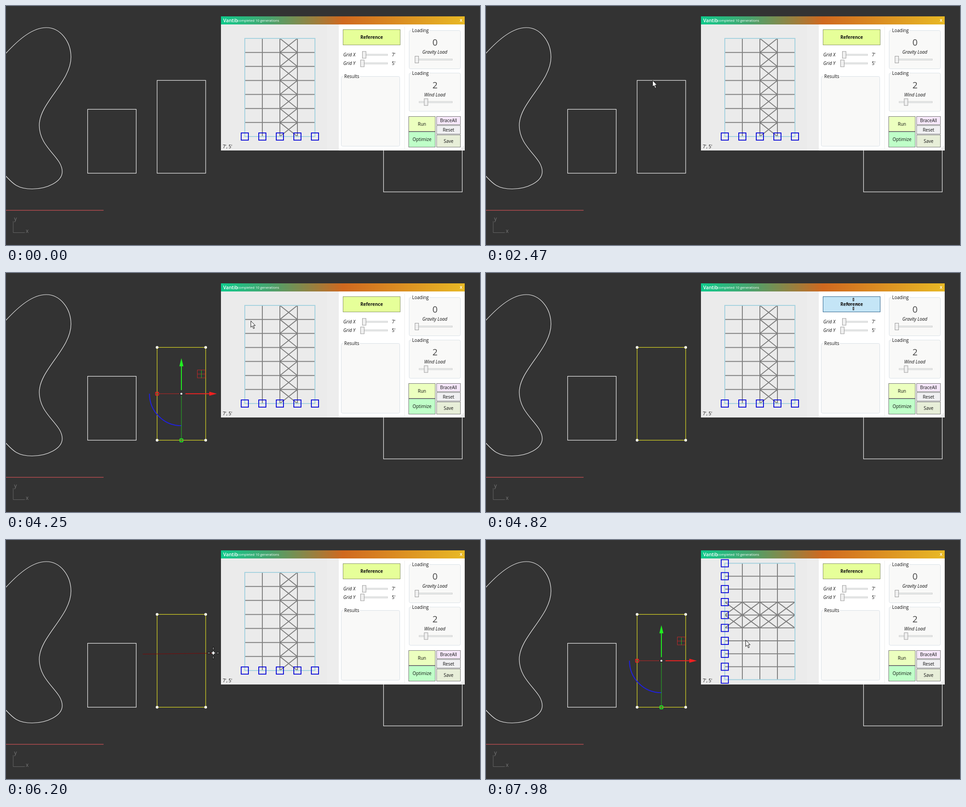
These frames come from a looping animation (1054 by 531 pixels, 8000 ms). An HTML page:

```html
<!DOCTYPE html>
<html lang="en">
<head>
<meta charset="utf-8">
<title>Bracing tool</title>
<style>
  html, body { margin: 0; width: 100%; height: 100%; overflow: hidden; background: #333; }
  svg { display: block; width: 1054px; height: 531px; }
  text { font: 10px "Open Sans", "Noto Sans", sans-serif; fill: #111; }
  .mid { text-anchor: middle; }
  .it { font-style: italic; }
  .bold { font-weight: 700; }
  .big { font-size: 20px; fill: #444; }
  .axis { font-size: 12px; fill: #777; }
  .title { font-size: 10.5px; font-weight: 600; fill: #fff; }
  .status { font-size: 7.6px; fill: #fff; }
  .wire { fill: none; stroke: #f0f0f0; stroke-width: 1.2; }
  .beam { fill: none; stroke: #808080; stroke-width: 2; }
  .edge { fill: none; stroke: #a6d2df; stroke-width: 2; }
  .pin { fill: none; stroke: #0000d8; stroke-width: 1.8; }
</style>
</head>
<body>
<svg viewBox="0 0 1054 531">
  <defs>
    <linearGradient id="bar">
      <stop offset="0" stop-color="#0fca8c"/>
      <stop offset=".2" stop-color="#48a36e"/>
      <stop offset=".5" stop-color="#d0681f"/>
      <stop offset="1" stop-color="#e8b925"/>
    </linearGradient>
  </defs>
  <rect width="1054" height="531" fill="#333"/>
  <path d="M0 453.9H217" stroke="#a0474b" stroke-width="1.6"/>
  <path d="M16 478V503.5H42" fill="none" stroke="#666"/>
  <text class="axis" x="18" y="477">y</text>
  <text class="axis" x="44" y="504">x</text>

  <path class="wire" d="M-2 107C30 72 60 48 90 48S144 78 144.5 113C145 168 74 215 74 265S125 335 125 368C125 390 92 406.5 58 406.5S14 393-2 376"/>
  <rect class="wire" x="181.5" y="229.5" width="108" height="142"/>
  <rect class="wire" x="839.5" y="300" width="175" height="113"/>
  <rect id="shape" class="wire" x="336" y="165.3" width="108" height="206.2"/>
  <g id="dots" fill="#fffff0"></g>

  <g id="gumball" fill="none" transform="translate(390 268.3)">
    <path d="M-71 0A71 71 0 0 0 0 71" stroke="#2020e0" stroke-width="2"/>
    <path d="M-49 0H-4" stroke="#f02020" stroke-width="1.4" stroke-dasharray="1.5"/>
    <path d="M0 5V100" stroke="#20e020" stroke-width="1.6" stroke-dasharray="1.5"/>
    <path d="M0-8V-62" stroke="#20f020" stroke-width="2"/>
    <path d="M0-79l4.5 18h-9z" fill="#20f020"/>
    <path d="M9 0H63" stroke="#f02020" stroke-width="2"/>
    <path d="M79 0l-17-4.5v9z" fill="#f02020"/>
    <rect x="-57.3" y="-3.3" width="6.6" height="6.6" rx="1" stroke="#f02020" stroke-width="1.8"/>
    <rect x="-3.3" y="100.1" width="6.6" height="6.6" rx="1" stroke="#20f020" stroke-width="1.8"/>
    <path d="M35.5-52.8h17.5v17.5h-17.5zm0 9h17.5" stroke="#c02828"/>
    <path d="M44.5-52v17" stroke="#20c020"/>
    <circle r="2.8" fill="#fff" stroke="#111"/>
  </g>

  <g id="window">
    <rect x="478" y="23" width="542" height="298" fill="#fff"/>
    <rect x="478" y="41" width="262" height="280" fill="#ebebeb"/>
    <rect x="714" y="41" width="26" height="280" fill="#ededed"/>
    <rect x="478" y="23" width="542" height="18" fill="url(#bar)"/>
    <text class="title" x="483" y="36">Vantib</text>
    <text class="status" x="515" y="35">completed 10 generations</text>
    <text class="title" x="1009" y="35">x</text>
    <path d="M886.5 46V320" stroke="#ececec"/>
    <path d="M1017 312v8m-3-5v5m-3-2v2" stroke="#b8b8b8" stroke-width="1.5" stroke-dasharray="1.5"/>
  </g>
  <g id="tall"></g>
  <g id="wide"></g>
  <text x="482" y="316">7', 5'</text>

  <rect id="drag" class="wire" stroke-dasharray="4 3"/>
  <line id="rubber" stroke="#7c0808" stroke-width="1.2"/>
  <path id="arrow" d="M.5 .5V14.6L3.8 11.5L6.2 17.5L8.5 16.6L6.1 10.8H10.4Z" fill="#fff" stroke="#111"/>
  <g id="cross">
    <g id="ticks" fill="#fff" stroke="#000"></g>
    <path id="star" d="M0-4.5L1.5-1.5L4.5 0L1.5 1.5L0 4.5L-1.5 1.5L-4.5 0L-1.5-1.5Z" fill="#fff"/>
  </g>
</svg>
<script>
const LOOP = 8000;
const $ = id => document.getElementById(id);

function add(parent, tag, attrs, text) {
  const el = document.createElementNS('http://www.w3.org/2000/svg', tag);
  set(el, attrs);
  if (text) el.textContent = text;
  parent.append(el);
  return el;
}
function set(el, attrs) {
  for (const k in attrs) el.setAttribute(k, attrs[k]);
}
const box = (parent, x, y, width, height, more) =>
  add(parent, 'rect', { x, y, width, height, ...more });
const show = (el, on) => { el.style.display = on ? '' : 'none'; };

// Window controls
const win = $('window');
const label = (x, y, text, cls = '') => add(win, 'text', { x, y, class: cls }, text);

function button(x, y, w, h, fill, text, cls = '') {
  const el = box(win, x + .5, y + .5, w - 1, h - 1, { fill, stroke: '#757575' });
  label(x + w / 2, y + h / 2 + 3.7, text, 'mid ' + cls);
  return el;
}
function group(x, y, w, h, text, gap) {
  box(win, x + .5, y + .5, w, h, { rx: 3, fill: '#f9f9f8', stroke: '#d9e0e6' });
  box(win, x + 5, y - 1, gap, 3, { fill: '#fff' });
  label(x + 7, y + 4, text);
}
function slider(x1, x2, y, thumb) {
  box(win, x1 + .5, y - 1.5, x2 - x1, 3, { fill: '#e7eaea', stroke: '#d2d2d2' });
  box(win, thumb + .5, y - 7.5, 8, 15, { fill: '#f0f0f0', stroke: '#999' });
}
function grid(y, name, value, thumb) {
  label(750, y, name, 'it');
  label(858, y, value);
  slider(thumb + 4, 848, y - 3.5, thumb);
}
function load(y, name, value, left, thumb) {
  group(896, y, 114, 85, 'Loading', 40);
  label(954, y + 34, value, 'big mid');
  label(953.5, y + 52, name, 'it mid');
  slider(left, 992, y + 65, thumb);
}

const reference = button(749, 52, 128, 35, '#e6ff99', 'Reference', 'bold');
grid(112, 'Grid X', "7'", 792);
grid(131, 'Grid Y', "5'", 788);
group(745, 156, 130, 155, 'Results', 37);
load(54, 'Gravity Load', '0', 913, 909);
load(148.5, 'Wind Load', '2', 918, 929.5);
button(895, 245, 60, 34, '#ecffbf', 'Run');
button(895, 279, 60, 35, '#bfffc8', 'Optimize');
button(957, 245, 54, 19, '#f6e8fa', 'BraceAll');
button(957, 265, 54, 20, '#f0f0f2', 'Reset');
button(957, 286, 54, 28, '#e7eed8', 'Save');

for (const x of [336, 444]) for (const y of [165.3, 371.5])
  add($('dots'), 'circle', { cx: x, cy: y, r: 3 });
for (let i = 0; i < 4; i++)
  box($('ticks'), 7, -1, 6, 2, { transform: `rotate(${i * 90})` });

// Structural frame: 4 bays wide, any number of storeys
function truss(parent, top, bottom, rows, braced, pinned) {
  const X = i => 531 + 39 * i, Y = j => top + (bottom - top) * j / rows;
  let d = '';
  for (let i = 1; i < 4; i++) d += `M${X(i)} ${top}V${bottom}`;
  for (let j = 1; j < rows; j++) d += `M531 ${Y(j)}H687`;
  for (let i = 0; i < 4; i++) for (let j = 0; j < rows; j++) if (braced(i, j))
    d += `M${X(i)} ${Y(j)}L${X(i + 1)} ${Y(j + 1)}M${X(i + 1)} ${Y(j)}L${X(i)} ${Y(j + 1)}`;
  add(parent, 'path', { d, class: 'beam' });
  box(parent, 531, top, 156, bottom - top, { class: 'edge' });
  for (let i = 0; i <= 4; i++) for (let j = 0; j <= rows; j++) if (pinned(i, j))
    box(parent, X(i) - 8, Y(j) - 8, 16, 16, { class: 'pin' });
}
truss($('tall'), 72, 290, 7, i => i === 2, (i, j) => j === 7);
truss($('wide'), 51.7, 310.3, 9, (i, j) => j === 3 || j === 4, i => i === 0);

// Pointer moves in even steps; a power above 1 slows towards the end
const moves = [];
const move = (start, end, steps, from, to, power = 1) =>
  moves.push({ start, end, steps, from, to, power });

move(110, 660, 8, [954, 459], [872, 180]);
move(1360, 1680, 5, [865, 161], [837, 60]);
move(1830, 1980, 3, [837, 59], [838, 58]);
move(2150, 2465, 5, [815, 72], [370, 165], 1.5);
move(2544, 2780, 4, [369, 168], [368, 180]);
move(2940, 3174, 4, [368, 172], [364, 138]);
move(3252, 3720, 7, [364, 138], [313, 216]);
move(3790, 4020, 4, [330, 208], [514, 116]);
move(4250, 4640, 6, [544, 106], [817, 69], 1.6);
move(4890, 5050, 3, [700, 110], [415, 230]);
move(5130, 5270, 3, [360, 246], [308, 252]);
move(5430, 5970, 8, [304, 253], [478, 251]);
move(6040, 6200, 3, [475, 251], [461, 251]);
move(7600, 7670, 2, [460, 252], [461, 252]);
move(7830, 7980, 3, [470, 251], [577, 222]);

function pointer(t) {
  const m = moves.filter(s => s.start <= t).pop();
  if (!m) return null;
  const last = m.steps - 1;
  const k = Math.min(last, Math.floor((t - m.start) / (m.end - m.start) * last + 1e-6));
  const f = 1 - (1 - k / last) ** m.power;
  return m.from.map((a, i) => Math.round(a + (m.to[i] - a) * f));
}

function draw(t) {
  const p = pointer(t);
  const [x, y] = p || [0, 0];
  const within = (a, b) => t >= a && t < b;
  const picking = within(4730, 6970), dragging = within(3252, 3642);
  const selected = t >= 3642, rebuilt = t >= 6970;

  show($('arrow'), p && !picking);
  show($('cross'), picking);
  show($('star'), within(4890, 6670));
  for (const id of ['arrow', 'cross']) set($(id), { transform: `translate(${x} ${y})` });

  const pressed = within(4650, 4890);
  const hover = !picking && x >= 749 && x < 877 && y >= 52 && y < 87;
  set(reference, {
    fill: pressed ? '#c4e5f6' : hover ? '#bee6fd' : '#e6ff99',
    stroke: pressed ? '#2c628b' : hover ? '#3c7fb1' : '#8b9668'
  });

  $('shape').style.stroke = selected ? '#e0dc24' : '';
  show($('dots'), selected);
  show($('gumball'), within(3720, 4730) || t >= 7050);
  show($('tall'), !rebuilt);
  show($('wide'), rebuilt);

  show($('drag'), dragging);
  if (dragging) set($('drag'), { x: x + .5, y: 138.5, width: 364 - x, height: y - 138 });
  show($('rubber'), within(5507, 6670));
  set($('rubber'), { x1: 304, y1: 253.5, x2: x, y2: y + .5 });
}

const start = performance.now();
function tick() {
  draw((performance.now() - start) % LOOP);
  requestAnimationFrame(tick);
}
tick();
</script>
</body>
</html>
```
